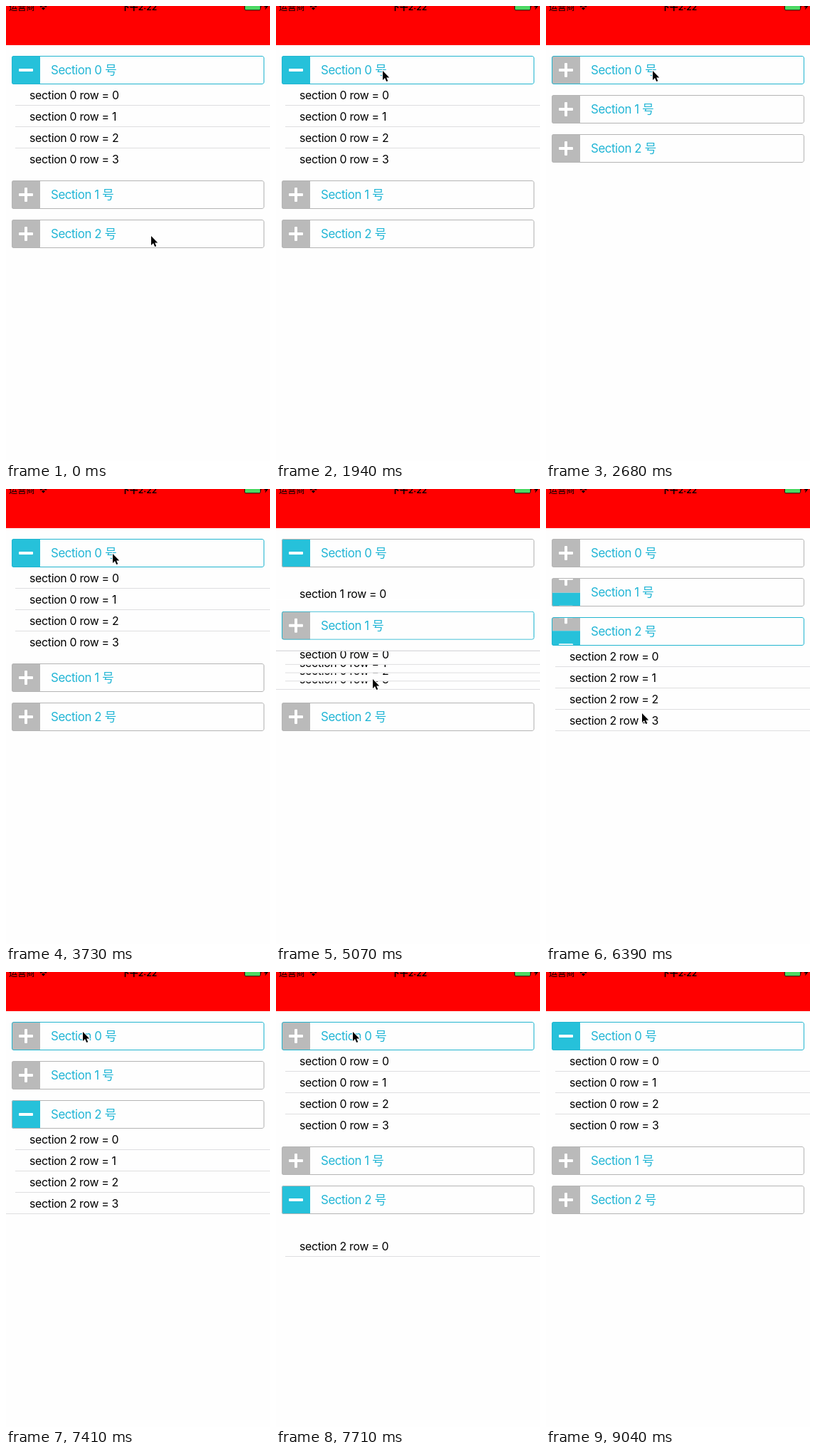
These frames come from a looping animation (371 by 639 pixels, 9.42 s). An HTML page:

```html
<!DOCTYPE html>
<html lang="zh-CN">
<head>
<meta charset="utf-8">
<title>Accordion list</title>
<style>
  html, body { margin: 0; width: 100%; height: 100%; overflow: hidden; background: #fefefe; }
  body { position: relative; font-family: Inter, "Noto Sans CJK SC", "Noto Sans CJK", sans-serif; }
  .row, .block, .footer, .bar, .cursor { position: absolute; left: 0; top: 0; }
  .row, .block, .footer { width: 371px; background: #fefefe; }
  .row {
    height: 30px; line-height: 32px; text-indent: 33px; white-space: pre;
    font-size: 15.85px; letter-spacing: -.3px; color: #000;
  }
  .row::after {
    content: ""; position: absolute; left: 13px; right: 0; bottom: 0;
    height: 1px; background: #dedee0;
  }
  .row.edge::after { left: 0; }
  .footer { height: 16px; box-sizing: border-box; border-bottom: 1px solid #cfcfd1; z-index: 20; }
  .block { height: 56px; }
  .head {
    position: absolute; left: 8px; top: 16px; width: 355px; height: 40px;
    border-radius: 3px; overflow: hidden;
  }
  .head::after {
    content: ""; position: absolute; inset: 0; border: 1px solid #b4b4b4; border-radius: 3px;
  }
  .tapped .head::after { border-color: #22b5cf; }
  .label {
    position: absolute; left: 55px; top: 0; line-height: 40px; white-space: pre;
    font-size: 16.85px; letter-spacing: -.41px; color: #20b5d5;
  }
  .icons { position: absolute; left: 0; top: 0; width: 40px; height: 80px; display: block; }
  .bar { z-index: 30; display: block; }
  .cursor { z-index: 40; overflow: visible; }
</style>
</head>
<body>
<svg class="bar" width="371" height="55">
  <rect width="371" height="55" fill="#f00"/>
  <text x="4" y="5.6" font-size="12.2">运营商</text>
  <path d="M47.6 .6Q52.5 -3.6 57.4 .6L56.2 1.9Q52.5 -1.2 48.8 1.9ZM50 3Q52.5 1 55 3L52.5 5.8Z"/>
  <text x="187" y="5.6" font-size="12" font-weight="600" text-anchor="middle">下午2:22</text>
  <rect x="335.5" y="-5" width="22" height="10.8" rx="1.5" fill="#4cd964" stroke="#000" stroke-width=".8"/>
  <path d="M358.6 -2Q360.4 0 358.6 2.4ZM366.4 -4L362.6 1.4H365L364 5.4L368.6 0H366Z"/>
</svg>
<svg class="cursor" width="12" height="18">
  <path d="M0 0V13L3 10L5.2 15L7.2 14.2L5.2 9.4H9.2Z" stroke="#fff" stroke-width="1.8" paint-order="stroke"/>
</svg>
<script>
// The screen refreshes every STEP ms; all times below count refreshes.
const LOOP = 9420, STEP = 148, SLIDE = 1.95, TRAVEL = 5;
const ROWS = 4, ROW_H = 30, PITCH = 55, TOP = 70, HEAD_H = 40, NONE = -1;

const TAPS = [
  { at: -10, open: 0 }, { at: 14.05, open: NONE }, { at: 21, open: 0 },
  { at: 32.88, open: 1 }, { at: 40.05, open: 2 }, { at: 50, open: 0 }
];

// Where the pointer rests, and when it arrives
const STOPS = [
  { at: 0, x: 204, y: 323 }, { at: 13, x: 150, y: 91 }, { at: 33, x: 136, y: 267 },
  { at: 39, x: 135, y: 315 }, { at: 48, x: 108, y: 84 }, { at: 60, x: 321, y: 628 }
];

const mix = (a, b, p) => a + (b - a) * p;
const ease = u => {
  u = Math.min(1, Math.max(0, u));
  return u * u * (3 - 2 * u);
};

function add(cls, html = "") {
  const el = document.createElement("div");
  el.className = cls;
  el.innerHTML = html;
  document.body.append(el);
  return el;
}

function place(el, y, x = 0) {
  el.style.transform = `translate(${x}px, ${y}px)`;
}

function show(el, on) {
  el.style.visibility = on ? "visible" : "hidden";
}

const ICONS = `<svg class="icons">
  <rect width="40" height="40" fill="#bababa"/>
  <rect y="40" width="40" height="40" fill="#26c1da"/>
  <g fill="#fff"><rect x="10" y="18" width="20" height="4" rx="1"/>
  <rect x="18" y="10" width="4" height="20" rx="1"/>
  <rect x="10" y="58" width="20" height="4" rx="1"/></g></svg>`;

const sections = [0, 1, 2].map(i => {
  const block = add("block", `<div class="head">${ICONS}<span class="label">Section ${i} 号</span></div>`);
  block.style.zIndex = 25 - i;
  const rows = Array.from({ length: ROWS }, (_, k) => {
    const row = add("row", `section ${i} row = ${k}`);
    row.style.zIndex = 10 - k;
    return row;
  });
  return { block, rows, icons: block.querySelector(".icons") };
});
const footer = add("footer");
const cursor = document.querySelector(".cursor");

const headTop = (i, open) => TOP + PITCH * i + (open !== NONE && i > open ? ROWS * ROW_H : 0);
const firstRow = i => TOP + HEAD_H + PITCH * i;

function drawList(n) {
  const now = TAPS.findLastIndex(tap => tap.at <= n);
  const to = TAPS[now].open, from = now ? TAPS[now - 1].open : to;
  const u = (n - TAPS[now].at) / SLIDE;
  const p = ease(u), flip = ease(u - 1); // the list slides first, then the icons
  const tapped = to === NONE ? from : to;
  // Closing rows gather at the end of the opening section or below their own head
  const gather = to > from ? firstRow(to) + ROWS * ROW_H : headTop(from, to) + HEAD_H + ROW_H;

  sections.forEach(({ block, rows, icons }, i) => {
    const top = mix(headTop(i, from), headTop(i, to), p);
    const opening = i === to, closing = !opening && i === from && u < 1.05;
    place(block, top - 16);
    block.classList.toggle("tapped", i === tapped);
    place(icons, -HEAD_H * mix(i === from, i === to, flip));
    rows.forEach((row, k) => {
      const home = firstRow(i) + k * ROW_H;
      show(row, opening || closing);
      row.classList.toggle("edge", closing && k === ROWS - 1);
      place(row, opening ? mix(firstRow(i - 1) - ROW_H, home, p) : mix(home, gather, p));
    });
    if (opening) place(footer, top + HEAD_H);
  });
  show(footer, from !== NONE && to > from && p > .05 && p < .95);
}

function drawCursor(n) {
  const now = STOPS.findLastIndex(stop => stop.at - TRAVEL <= n);
  const b = STOPS[now], a = STOPS[Math.max(0, now - 1)];
  const p = ease((n - b.at) / TRAVEL + 1);
  place(cursor, Math.round(mix(a.y, b.y, p)), Math.round(mix(a.x, b.x, p)));
  show(cursor, n <= STOPS.at(-1).at);
}

const begin = performance.now();
function tick() {
  const n = Math.floor((performance.now() - begin) % LOOP / STEP);
  drawList(n);
  drawCursor(n);
  requestAnimationFrame(tick);
}
tick();
</script>
</body>
</html>
```
